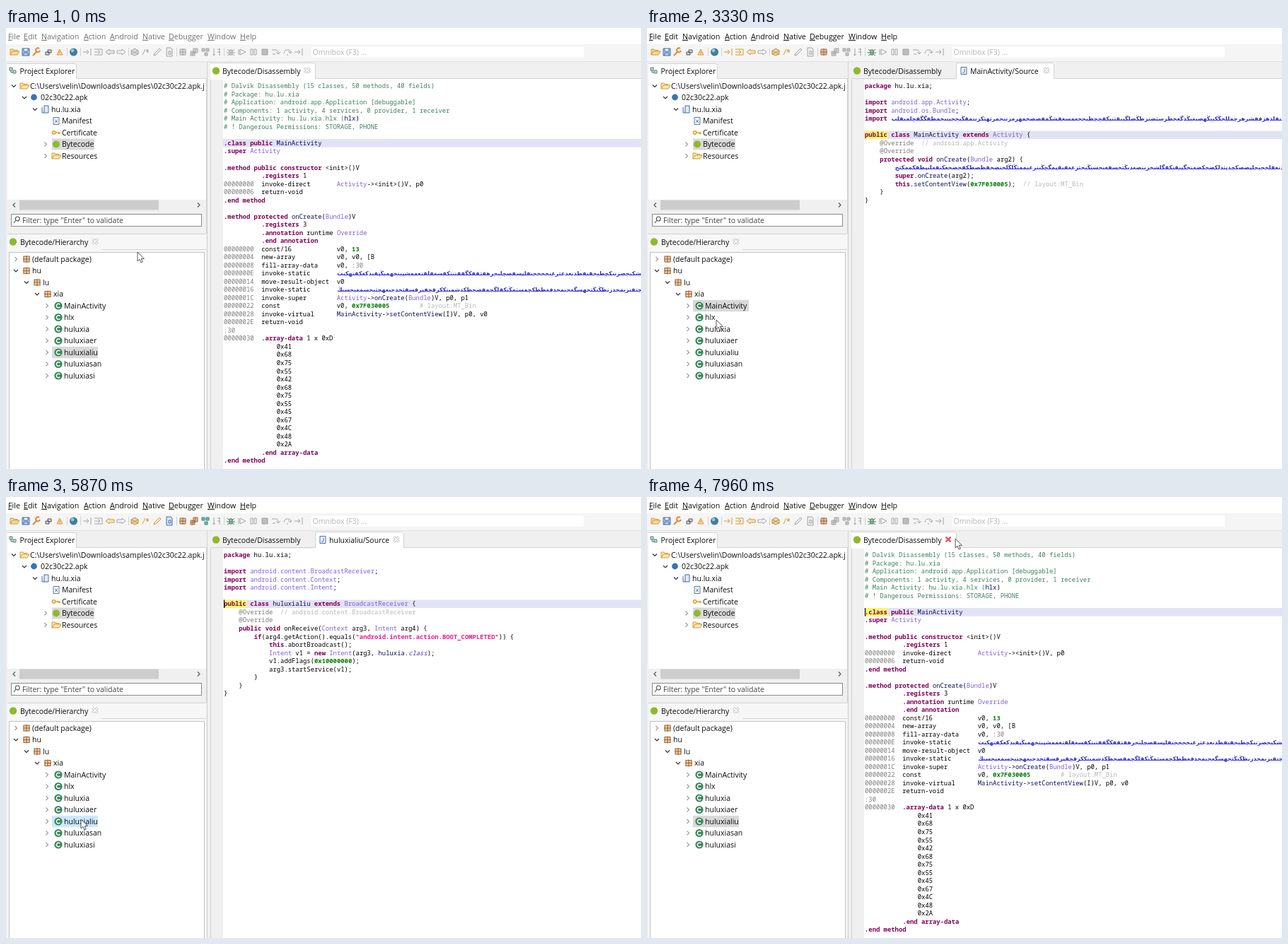
An HTML page for the animation above (8000 ms loop, 898x624 px).

```html
<!DOCTYPE html>
<html lang="en">
<head>
<meta charset="utf-8">
<title>Bytecode browser</title>
<style>
html, body { margin: 0; width: 100%; height: 100%; overflow: hidden; background: #f0f0f0; }
svg { display: block; width: 100%; height: 100%; }
text { font: 10.5px "Open Sans", "Noto Sans", sans-serif; fill: #0c0c0c; white-space: pre; }
.menu text { font-size: 10.7px; }
.menu.off text { fill: #707070; }
.u { text-decoration: underline; }
.code { font: 8.9px "Noto Sans Mono", "DejaVu Sans Mono", monospace; fill: #000; }
.arabic { font: bold 8px "DejaVu Sans", sans-serif; fill: #2a2ad6; }
.head { fill: #3f7f5f; }
.note { fill: #b8b8b8; }
.dim { fill: #7c7c7c; }
.str { fill: #e0218a; font-weight: bold; }
.cls { fill: #50309a; font-style: italic; }
.key { fill: #7f0055; font-weight: bold; }
.num { fill: #0a7d0a; font-weight: bold; }
.type { fill: #8060d0; }
.name { fill: #101060; }
</style>
</head>
<body>
<svg id="stage" viewBox="0 0 898 624" xmlns="http://www.w3.org/2000/svg"></svg>
<script>
const CODE_X = 308, CHAR = 5.34, LINE = 11.52, TOP = 82;
const GREEN = '#8fb92d', BROWN = '#a8652c', GOLD = '#d99a1c', BLUE = '#3f6fb0', GREY = '#a4a4a4';

const rect = (x, y, w, h, fill, more = '') =>
  `<rect x="${x}" y="${y}" width="${w}" height="${h}" fill="${fill}" ${more}/>`;
const text = (x, mid, s, more = '') => `<text x="${x}" y="${mid + 3.8}" ${more}>${s}</text>`;
const dot = (x, y, r, fill) => `<circle cx="${x}" cy="${y}" r="${r}" fill="${fill}"/>`;
const line = (d, color = '#d2d2d2', width = 1) =>
  `<path d="${d}" fill="none" stroke="${color}" stroke-width="${width}"/>`;
const icon = (x, y, d, color, fill = 0, width = 1, more = '') =>
  `<g transform="translate(${x} ${y})" color="${color}" ${more}><path d="${d}" stroke="currentColor"
    stroke-width="${width}" fill="currentColor" fill-opacity="${fill}"/></g>`;

const shapes = {
  folder: 'M-6 4V-4h4l1 1.5h5V-1M-6 4L-3-1H7L4 4Z',
  save: 'M-5-5H5V5H-5ZM-3-5V-1H3V-5M-3 5V1H3V5',
  wrench: 'M-5 5L1-1M4-5A3 3 0 1 0 5-2',
  windows: 'M-1-3H4V1H-1ZM-4 0H1V4H-4Z',
  warn: 'M0-4L4 4H-4ZM0-1V2',
  toEnd: 'M-6 0H2M-1-3L2 0L-1 3M5-5V5',
  into: 'M-6-4H5V4H-6M-6 0H2M-1-3L2 0L-1 3',
  back: 'M-6 0L-1-4V-2H6V2H-1V4Z',
  next: 'M6 0L1-4V-2H-6V2H1V4Z',
  puzzle: 'M-5-2L0-5L5-2V3L0 5L-5 3ZM-5-2L5 3M5-2L-5 3',
  comment: 'M-5 4L-1-4M2-4V1M0-3L4 0M4-3L0 0',
  pencil: 'M-5 5L-4 2L3-5L5-3L-2 4Z',
  doc: 'M-4-6H2L4-4V6H-4ZM-1-1H2V3H-1Z',
  pack: 'M-4-4H4V4H-4ZM0-5V5M-5 0H5',
  packs: 'M-1-5H5V1H-1ZM-5-1H1V5H-5ZM2-5V1M-2-1V5M-5 2H1',
  nodes: 'M-5-5H-1V-1H-5ZM1-5H5V-1H1ZM-1 1H3V5H-1Z',
  sort: 'M-4-5V5M-6 3L-4 5L-2 3M1-4H5M1 0H5M4-5V5',
  bug: 'M-2-3H2V4H-2ZM-5-4L-2-1M5-4L2-1M-6 1H6M-5 5L-2 3M5 5L2 3',
  play: 'M-5-4V4M-3-4L5 0L-3 4Z',
  pause: 'M-4-4H-1V4H-4ZM1-4H4V4H1Z',
  stop: 'M-4-4H4V4H-4Z',
  stepIn: 'M-6-3H0Q3-3 3 2M0 0L3 3L6 0M-5 3H-1',
  stepOver: 'M-5 2Q-4-4 1-3T4 1M1-1L4 2L6-1M-1 4H1',
  close: 'M-3.5-3.5L3.5 3.5M3.5-3.5L-3.5 3.5'
};

// Enabled modes: o = busy, n = normal, a = class opening
const tools = [
  [12, 'folder', GOLD, 'ona', .3], [28, 'save', BLUE, 'ona', .3], [43, 'wrench', '#dd8a2b', 'ona', 0, 2],
  [60, 'windows', '#555', 'ona', .2], [76, 'warn', '#e09a28', 'ona', .35],
  [115, 'toEnd', GOLD, 'n'], [131, 'into', GOLD, 'n'], [147, 'back', GOLD, 'na', .15], [163, 'next', GOLD, ''],
  [182, 'puzzle', '#c4912d', 'na', .3], [198, 'comment', GOLD, 'na'], [214, 'pencil', GOLD, 'a', .1],
  [231, 'doc', BLUE, 'a', .1], [250, 'pack', BROWN, 'na', .35], [266, 'packs', BROWN, 'a', .35],
  [282, 'nodes', '#2f8a86', 'a', .6], [298, 'sort', BLUE, ''], [318, 'bug', '#3f7d5b', 'na', .4],
  [334, 'play', BLUE, ''], [350, 'pause', BLUE, ''], [366, 'stop', BLUE, '', .7],
  [382, 'stepIn', BLUE, ''], [398, 'stepOver', BLUE, ''], [414, 'toEnd', BLUE, '']
];
const toolbar = tools.map(([x, shape, color, on, fill = 0, width = 1]) =>
  icon(x, 34, shapes[shape], color, fill, width, `class="tool" data-on="${on}" data-color="${color}"`)).join('') +
  dot(95.5, 34, 5.5, '#3d7f9e') + dot(94, 32, 2.4, '#9cc8c8') +
  line('M86.5 28V40M105.5 28V40M173.5 28V40M241.5 28V40M308.5 28V40');

const menu = [[3, 'File'], [25, 'Edit'], [50, 'Navigation'], [110, 'Action'], [147, 'Android'],
  [193, 'Native'], [230, 'Debugger'], [285, 'Window'], [331, 'Help']]
  .map(([x, s]) => text(x, 12, `<tspan class="u">${s[0]}</tspan>${s.slice(1)}`)).join('');

const twisty = (x, y, open) => open
  ? line(`M${x - 3} ${y - 1.5}l3 3l3-3`, '#333', 1.2)
  : line(`M${x - 1.5} ${y - 3}l3 3l-3 3`, '#999', 1.1);
const closeMark = (x, y, more = '') =>
  `<g ${more}>${icon(x, y, shapes.close, '#8c8c8c', 0, 3)}${icon(x, y, shapes.close, '#fff', 0, 1.8)}</g>`;
const packIcon = (x, y) => icon(x, y, shapes.pack, BROWN, .3, 1.2);

const classes = [['MainActivity', 144], ['hlx', 97], ['huluxia', 118], ['huluxiaer', 128],
  ['huluxialiu', 130], ['huluxiasan', 135], ['huluxiasi', 126]];
const packages = [[14, '(default package)', false], [14, 'hu', true], [29, 'lu', true], [44, 'xia', true]];
const hierarchy =
  packages.map(([x, s, open], i) => {
    const y = 327 + i * 16.5;
    return twisty(x, y, open) + packIcon(x + 15, y) + text(x + 23, y, s);
  }).join('') +
  classes.map(([s, end], i) => {
    const y = 393 + i * 16.5;
    return rect(65, y - 8.2, end - 65, 16.4, 'none', `data-row="${s}"`) + twisty(58, y) +
      dot(74, y, 5.6, '#39885a') + line(`M${76.3} ${y - 1.8}a2.8 2.8 0 1 0 0 3.6`, '#fff', 1.4) + text(82, y, s);
  }).join('');

const project = `<g clip-path="url(#projectClip)">` +
  twisty(11, 82, true) + icon(26, 82, shapes.folder, GOLD, .25) +
  text(34, 82, 'C:\\Users\\velin\\Downloads\\samples\\02c30c22.apk.jdb2') +
  twisty(26, 98.5, true) + dot(39.5, 98, 4.4, '#3b72b5') + text(49, 98.5, '02c30c22.apk') +
  twisty(41, 115, true) + icon(57, 115, 'M-3-5H3V5H-3ZM-6-3V5H-3', BLUE, .15) + text(64, 115, 'hu.lu.xia') +
  icon(71, 131.5, 'M-4-5H4V5H-4ZM-2-2L2 3M2-2L-2 3', '#56789c') + text(79, 131.5, 'Manifest') +
  icon(71, 148, 'M-1 0A2.3 2.3 0 1 1-1-.1H5V2M3 0V2', GOLD, .15, 1.4) + text(79, 148, 'Certificate') +
  rect(65, 156.5, 60, 16, '#d9d9d9') + twisty(56, 164.5) + dot(71, 164.5, 5, GREEN) + text(79, 164.5, 'Bytecode') +
  twisty(56, 181) + icon(71, 181, shapes.folder, GOLD, .25) + text(79, 181, 'Resources') + '</g>';

const leftSide =
  rect(2, 50, 97, 23, '#fff') + line('M99.5 71.5V53Q99.5 50.5 97 50.5H2M99.5 71.5H283.5V291') +
  icon(10, 60, 'M-5-4H-1V0H-5ZM0 0H4V4H0ZM-3 0V3H0', '#4c8577', .3) + text(19.5, 61, 'Project Explorer') +
  rect(2, 72, 281, 171, '#fff') + project +
  rect(2, 243, 281, 15, '#f0f0f0') + rect(19, 243.5, 197, 14, '#cdcdcd') +
  line('M13 247.5l-3 3l3 3M271 247.5l3 3l-3 3', '#555', 1.2) +
  rect(7.5, 263.5, 269, 17, '#fff', 'stroke="#8a8a8a"') +
  icon(15, 271, 'M-4 5L-1 1M-1 1A3 3 0 1 1 1 2Z', '#555', 0, 1.2) +
  text(23, 272, 'Filter: type "Enter" to validate', 'style="fill:#444"') +
  rect(2, 291, 281, 333, '#f7f7f7') + line('M2 291.5H283M135 313.5H283') +
  dot(10, 302.5, 5.2, GREEN) + text(20, 303, 'Bytecode/Hierarchy') + closeMark(126, 302) +
  rect(4.5, 317.5, 276, 310, '#fff', 'stroke="#c2c2c2"') + hierarchy;

// Source views: ¤ stands for a run of scrambled identifier letters
const op = (offset, name, args) => offset.padStart(8, '0') + '  ' + name.padEnd(20) + args;
const pad = n => ' '.repeat(n);
const bytes = '41 68 75 55 42 68 75 55 45 67 4C 48 2A'.split(' ').map(b => pad(14) + '0x' + b);
const views = {
  disassembly: { current: 7, lines: [
    '# Dalvik Disassembly (15 classes, 50 methods, 40 fields)',
    '# Package: hu.lu.xia',
    '# Application: android.app.Application [debuggable]',
    '# Components: 1 activity, 4 services, 0 provider, 1 receiver',
    '# Main Activity: hu.lu.xia.hlx (hlx)',
    '# ! Dangerous Permissions: STORAGE, PHONE', '',
    '.class public MainActivity', '.super Activity', '',
    '.method public constructor <init>()V', pad(10) + '.registers 1',
    op('0', 'invoke-direct', 'Activity-><init>()V, p0'), op('6', 'return-void', ''), '.end method', '',
    '.method protected onCreate(Bundle)V', pad(10) + '.registers 3',
    pad(10) + '.annotation runtime Override', pad(10) + '.end annotation',
    op('0', 'const/16', 'v0, 13'), op('4', 'new-array', 'v0, v0, [B'), op('8', 'fill-array-data', 'v0, :30'),
    op('E', 'invoke-static', '¤'), op('14', 'move-result-object', 'v0'), op('16', 'invoke-static', '¤'),
    op('1C', 'invoke-super', 'Activity->onCreate(Bundle)V, p0, p1'),
    op('22', 'const', 'v0, 0x7F030005        # layout:MT_Bin'),
    op('28', 'invoke-virtual', 'MainActivity->setContentView(I)V, p0, v0'), op('2E', 'return-void', ''),
    ':30', op('30', '.array-data 1 x 0xD', ''), ...bytes, pad(10) + '.end array-data', '.end method'] },
  MainActivity: { current: 6, end: 576, lines: `package hu.lu.xia;

import android.app.Activity;
import android.os.Bundle;
import ¤

public class MainActivity extends Activity {
    @Override  // android.app.Activity
    @Override
    protected void onCreate(Bundle arg2) {
        ¤
        super.onCreate(arg2);
        this.setContentView(0x7F030005);  // layout:MT_Bin
    }
}`.split('\n') },
  hlx: { current: 7, end: 530, lines: `package hu.lu.xia;

import android.app.Activity;
import android.content.Intent;
import android.os.Bundle;
import ¤

public class hlx extends Activity {
    @Override  // android.app.Activity
    @Override
    protected void onCreate(Bundle arg3) {
        ¤
        super.onCreate(arg3);
        this.setContentView(0x7F030000);  // layout:MT_Bin
        this.startService(new Intent(this, huluxia.class));
    }
}`.split('\n') },
  huluxialiu: { current: 6, end: 563, lines: `package hu.lu.xia;

import android.content.BroadcastReceiver;
import android.content.Context;
import android.content.Intent;

public class huluxialiu extends BroadcastReceiver {
    @Override  // android.content.BroadcastReceiver
    @Override
    public void onReceive(Context arg3, Intent arg4) {
        if(arg4.getAction().equals("android.intent.action.BOOT_COMPLETED")) {
            this.abortBroadcast();
            Intent v1 = new Intent(arg3, huluxia.class);
            v1.addFlags(0x10000000);
            arg3.startService(v1);
        }
    }
}`.split('\n') }
};

const syntax = new RegExp([
  '(?<head>^#(?:(?!hlx\\)).)*)',
  '(?<note>//.*|# layout.*)',
  '(?<dim>@Override|^[\\dA-F]{8}|:30)',
  '(?<str>"[^"]*")',
  '(?<key>(?<!\\w)\\.(?:class|super|method|registers|annotation|array-data|end [\\w-]+)' +
    '|(?<![-\\w.])(?:package|import|public|class|extends|protected|void|super|this|new|if|constructor)(?![-\\w]))',
  '(?<cls>(?<=\\w\\.)class)',
  '(?<num>0x[\\dA-F]{8}|\\b13$)',
  '(?<type>android\\.[\\w.]+|\\b(?:Activity|Bundle|Context|Intent|BroadcastReceiver|Override)\\b)',
  '(?<name>\\b(?:MainActivity|hlx|huluxia|huluxialiu|onCreate|setContentView)\\b)'
].join('|'), 'g');

const highlight = s => s.replace(/</g, '&lt;').replace(syntax, (m, ...rest) => {
  const groups = rest.at(-1);
  return `<tspan class="${Object.keys(groups).find(k => groups[k])}">${m}</tspan>`;
});

function scramble(seed) {
  const letters = 'بتثنيسشصضطظفقكگلمهچخجحپعغثبنيتقفلمكڭزرد';
  let s = '';
  for (let i = 0; i < 220; i++) {
    seed = (seed * 1103515245 + 12345) % 2147483648;
    s += letters[Math.floor(seed / 2147483648 * letters.length)];
  }
  return s;
}

function codeLine(s, i) {
  const y = TOP + i * LINE + 3.3, at = s.indexOf('¤');
  const indent = s.search(/\S/);
  if (indent < 0) return '';
  const body = s.replace('¤', '').trim();
  return (body ? `<text class="code" x="${CODE_X + indent * CHAR}" y="${y}">${highlight(body)}</text>` : '') +
    (at < 0 ? '' : `<text class="arabic" x="${CODE_X + at * CHAR}" y="${y - .3}">${scramble(i * 7 + 3)}</text>`);
}

function tabs(name, end) {
  const left = rect(289, 49, 148, 24, end ? '#f0f0f0' : '#fff') + dot(297, 60.5, 5.2, GREEN) +
    text(306, 61, 'Bytecode/Disassembly');
  if (!end) return left + closeMark(426, 60, 'id="tabClose"') +
    icon(426, 60, shapes.close, '#dc5560', 0, 2.4, 'id="tabHot"') +
    line('M289 49.5H434.5Q437.5 49.5 437.5 52.5V71.5H898');
  return left + rect(438, 49, end - 438, 24, '#fff') +
    line(`M289 71.5H437.5V49.5H${end - 3}Q${end - .5} 49.5 ${end - .5} 52.5V71.5H898`) +
    icon(448, 60.5, 'M-4-5H4V5H-4ZM1-3V2Q0 4-2 2', BLUE, .08) +
    text(457, 61, name + '/Source') + closeMark(end - 11, 60);
}

const editors = Object.entries(views).map(([name, { current, end, lines }]) => {
  const y = TOP + current * LINE - 5.6;
  return `<g data-view="${name}">${tabs(name, end)}` +
    rect(307, y, 591, 11.6, '#e2e2f5') + rect(308, y, 32.2, 11.6, '#fdf867', 'class="mark"') +
    lines.map(codeLine).join('') + rect(308, y, 1.2, 11.6, '#111', 'class="caret"') + '</g>';
}).join('');

const stage = document.getElementById('stage');
stage.innerHTML = `<clipPath id="projectClip">${rect(2, 72, 279, 171, '#fff')}</clipPath>` +
  rect(0, 0, 898, 624, '#f0f0f0') + rect(0, 0, 898, 23, '#fff') + rect(0, 23, 898, 25, '#f5f5f5') +
  `<g class="menu" id="menu">${menu}</g>` + toolbar +
  rect(432, 26.5, 385, 15, '#fff') + text(433.5, 34.5, 'Omnibox (F3) ...', 'style="fill:#b5b5b5"') +
  line('M0 47.5H898', '#e2e2e2') + leftSide + line('M284.5 48V624M289.5 48V624') +
  rect(290, 72, 17, 552, '#f0f0f0') + rect(307, 72, 591, 552, '#fff') + editors +
  '<path id="pointer" d="M0 0V13L3 10.3L5 15L7.2 14L5.2 9.6H9.4Z" fill="#fff" stroke="#444" stroke-width=".9"/>';

const steps = [
  [0, { x: 186, y: 317, bar: 'o', view: 'disassembly', sel: 'huluxialiu', hot: 0, hover: '', mark: 0, caret: 0, red: 0 }],
  [190, { x: 182, y: 324, bar: 'n' }],
  [320, { x: 168, y: 346, mark: 1 }],
  [460, { x: 148, y: 373 }],
  [590, { x: 130, y: 388, hover: 'MainActivity' }],
  [730, { x: 127, y: 390, caret: 1 }],
  [860, { sel: 'MainActivity', hot: 1, hover: '' }],
  [1250, { caret: 0 }],
  [1750, { view: 'MainActivity', caret: 1 }],
  [2250, { caret: 0 }],
  [2750, { caret: 1 }],
  [2860, { x: 122, y: 402, hot: 0 }],
  [3000, { x: 108, y: 434, hover: 'huluxiaer' }],
  [3130, { x: 103, y: 424, hover: 'huluxia' }],
  [3250, { x: 98, y: 413, hover: '', caret: 0 }],
  [3720, { caret: 1, sel: 'hlx', hot: 1 }],
  [3810, { bar: 'a' }],
  [4010, { view: 'hlx' }],
  [4110, { bar: 'n' }],
  [4590, { caret: 0 }],
  [4790, { x: 101, y: 432, hot: 0, hover: 'huluxia' }],
  [5000, { x: 106, y: 454, hover: 'huluxialiu', caret: 1 }],
  [5200, { y: 456 }],
  [5490, { sel: 'huluxialiu', hot: 1, hover: '' }],
  [5690, { bar: 'a' }],
  [5780, { view: 'huluxialiu', caret: 1 }],
  [5980, { bar: 'n' }],
  [6270, { caret: 0 }],
  [6870, { x: 134, y: 408, caret: 1, hot: 0 }],
  [6970, { x: 196, y: 330 }],
  [7160, { x: 320, y: 180 }],
  [7360, { x: 408, y: 86, caret: 0 }],
  [7560, { x: 434, y: 61 }],
  [7750, { x: 436, y: 59, caret: 1 }],
  [7960, { view: 'disassembly', red: 1 }]
];

const all = q => [...stage.querySelectorAll(q)];
const byId = id => document.getElementById(id);
const show = (el, on) => { el.style.display = on ? '' : 'none'; };
const rows = all('[data-row]'), panes = all('[data-view]'), buttons = all('.tool');
const marks = all('.mark'), carets = all('.caret');

function render(s) {
  byId('pointer').setAttribute('transform', `translate(${s.x} ${s.y})`);
  byId('menu').classList.toggle('off', s.bar === 'o');
  buttons.forEach(b => b.setAttribute('color', b.dataset.on.includes(s.bar) ? b.dataset.color : GREY));
  rows.forEach(r => {
    const name = r.dataset.row;
    r.setAttribute('fill', name === s.sel ? (s.hot ? '#cce8ff' : '#d9d9d9') : name === s.hover ? '#e5f3ff' : 'none');
  });
  panes.forEach(p => show(p, p.dataset.view === s.view));
  marks.forEach(m => show(m, s.mark));
  carets.forEach(c => show(c, s.caret));
  show(byId('tabClose'), !s.red);
  show(byId('tabHot'), s.red);
}

const start = performance.now();
let shown = -1;
function tick() {
  const t = (performance.now() - start) % 8000;
  const index = steps.findLastIndex(([at]) => at <= t);
  if (index !== shown) {
    shown = index;
    render(Object.assign({}, ...steps.slice(0, index + 1).map(step => step[1])));
  }
  requestAnimationFrame(tick);
}
tick();
</script>
</body>
</html>
```
